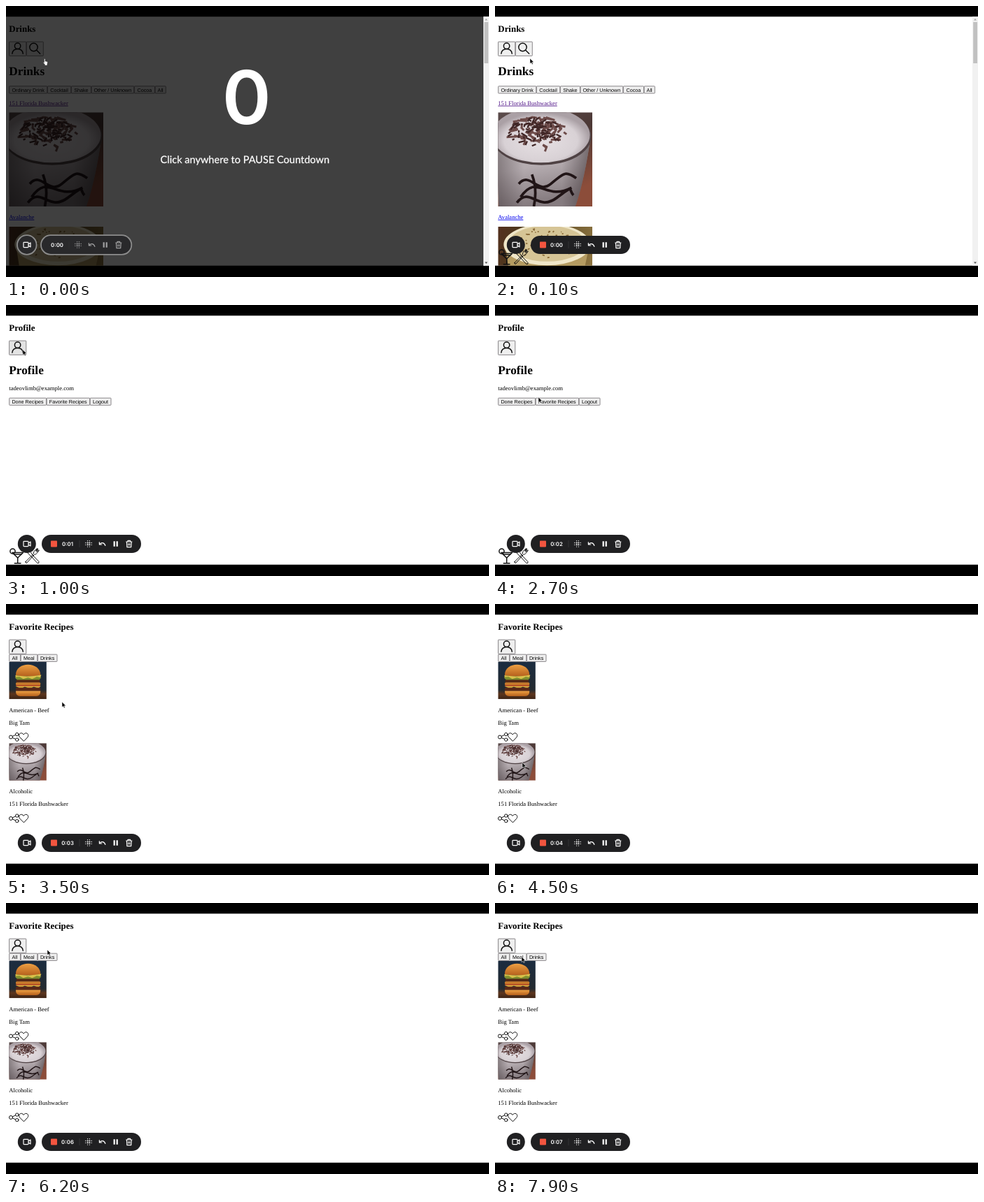
An HTML page for the animation above (8000 ms loop, 690 by 388 pixels).

```html
<!DOCTYPE html>
<html lang="en">
<head>
<meta charset="utf-8">
<title>Recipe app demo</title>
<style>
html, body { margin: 0; width: 100%; height: 100%; overflow: hidden; background: #000; }
svg { display: block; width: 100vw; height: 100vh; }
text { font: 8.6px "Liberation Serif", "Times New Roman", serif; text-rendering: geometricPrecision; }
.h2 { font-size: 12.93px; font-weight: 700; }
.h1 { font-size: 17.25px; font-weight: 700; }
.btn rect { fill: #efefef; stroke: #7d7a7d; stroke-width: .9; }
.btn text { font: 7.19px "Liberation Sans", Arial, sans-serif; text-anchor: middle; }
.btn.hover rect { fill: #e3e3e3; }
.btn.active rect { fill: #f6f6f6; stroke: #999; }
.line { fill: none; stroke: #111; stroke-width: 1.5; stroke-linecap: round; stroke-linejoin: round; }
.thin { stroke-width: 1; }
.link { text-decoration: underline; }
.clock { font: 600 7.8px Inter, sans-serif; fill: #fff; text-anchor: middle; }
.tool { fill: none; stroke: #fff; stroke-width: 1.2; stroke-linejoin: round; }
.count { font: 600 106px Inter, sans-serif; fill: #fff; text-anchor: middle; }
.hint { font: 14.55px Lato, sans-serif; fill: #fff; stroke: #fff; stroke-width: .25; text-anchor: middle; }
</style>
</head>
<body>
<svg id="stage" viewBox="0 0 690 388" preserveAspectRatio="none"></svg>
<script>
const LOOP = 8000, STEP = 100;

// time, x, y of the pointer tip
const PATH = [
  [0, 53, 75], [100, 50, 75], [500, 37, 69], [900, 24, 64], [1500, 24, 64],
  [2000, 36, 94], [2400, 50, 119], [2700, 62, 132], [3200, 80, 139], [3700, 80, 141],
  [3900, 80, 142], [4200, 62, 178], [4500, 39, 227], [4800, 34, 281], [5100, 33, 281],
  [5300, 33, 281], [5800, 44, 160], [6200, 59, 67], [6300, 59, 67], [6500, 60, 75],
  [6900, 60, 75], [7200, 38, 77], [8000, 38, 77]
];
const PRESSES = [[900, 1000], [3300, 3400], [6700, 6800], [7900, 8000]];

let seed = 7;
const rnd = () => (seed = seed * 16807 % 2147483647) / 2147483647;
const list = (n, fn) => Array.from({ length: n }, (_, i) => fn(i)).join("");

const text = (x, y, s, attrs = "") => `<text x="${x}" y="${y}" ${attrs}>${s}</text>`;
const use = (id, x, y, k = 1) => `<use href="#${id}" transform="translate(${x} ${y}) scale(${k})"/>`;

const button = (x, y, w, h, inner) =>
  `<g class="btn" data-box="${[x, y, x + w, y + h]}"><rect x="${x + .4}" y="${y + .4}" width="${w - .6}" height="${h - .8}" rx=".6"/>${inner}</g>`;

const buttonRow = (y, edges, labels) => labels.map((s, i) => {
  const x = edges[i], w = edges[i + 1] - x;
  return button(x, y, w, 11, text(x + w / 2, y + 8.2, s));
}).join("");

const person = button(4.2, 50.8, 24.8, 21,
  `<g class="line"><circle cx="16.6" cy="57.2" r="4.2"/><path d="M8.9 68.3C9.2 59.2 24 59.2 24.3 68.3"/></g>`);
const search = button(29, 50.8, 24.5, 21,
  `<g class="line"><circle cx="39.5" cy="59" r="5.7"/><path d="M43.7 63.2L48.7 68.3"/></g>`);

// strokes scattered inside an ellipse
const scatter = (n, cx, cy, rx, ry, len) => list(n, () => {
  const a = rnd() * 6.28, r = Math.sqrt(rnd()), d = rnd() * 3.14, l = len * (.4 + rnd());
  const x = cx + rx * r * Math.cos(a), y = cy + ry * r * Math.sin(a);
  return `M${x.toFixed(1)} ${y.toFixed(1)}l${(l * Math.cos(d)).toFixed(1)} ${(l * .6 * Math.sin(d)).toFixed(1)}`;
});

const defs = `<defs>
<linearGradient id="wall" x2=".5" y2="1"><stop stop-color="#5b4c4c"/><stop offset=".5" stop-color="#4c3835"/><stop offset="1" stop-color="#8c4d3a"/></linearGradient>
<linearGradient id="mugFill" x2=".25" y2="1"><stop stop-color="#c6bfc2"/><stop offset=".5" stop-color="#b5acb0"/><stop offset="1" stop-color="#857b7f"/></linearGradient>
<linearGradient id="side"><stop stop-color="#2a2022" stop-opacity=".4"/><stop offset=".3" stop-color="#2a2022" stop-opacity="0"/><stop offset=".7" stop-color="#2a2022" stop-opacity="0"/><stop offset="1" stop-color="#2a2022" stop-opacity=".5"/></linearGradient>
<radialGradient id="foam" cy=".6"><stop stop-color="#e6e0e3"/><stop offset=".75" stop-color="#d8d1d5"/><stop offset="1" stop-color="#aaa0a5"/></radialGradient>
<linearGradient id="gold" x2="1" y2=".3"><stop stop-color="#54301f"/><stop offset=".3" stop-color="#4b3b1c"/><stop offset="1" stop-color="#8d7440"/></linearGradient>
<linearGradient id="night" x2="0" y2="1"><stop stop-color="#1b2c40"/><stop offset=".75" stop-color="#232a30"/><stop offset=".86" stop-color="#5c351d"/><stop offset="1" stop-color="#3c2416"/></linearGradient>
<linearGradient id="bun" x2="0" y2="1"><stop stop-color="#eda043"/><stop offset="1" stop-color="#b5601c"/></linearGradient>
<clipPath id="square"><path d="M0 0H100V100H0z"/></clipPath>
<clipPath id="page"><path d="M0 15.3H690V371.7H0z"/></clipPath>
<g id="mug" clip-path="url(#square)">
  <path fill="url(#wall)" d="M0 0H100V100H0z"/>
  <path fill="url(#mugFill)" d="M-3 25L1 100H82Q91 75 98 28z"/>
  <path fill="url(#side)" d="M-3 25L1 100H82Q91 75 98 28z"/>
  <ellipse cx="46" cy="26" rx="53" ry="30" fill="#4f4244"/>
  <ellipse cx="45.5" cy="24" rx="52" ry="29.5" fill="url(#foam)"/>
  <path d="${scatter(85, 40, 21, 31, 17, 8)}" fill="none" stroke="#6d4b49" stroke-width="2.2"/>
  <path d="${scatter(65, 40, 20, 29, 15, 7)}" fill="none" stroke="#412727" stroke-width="1.7"/>
  <path d="M22 76C34 62 42 88 56 76S72 62 83 70M24 90C42 64 50 95 78 80M20 96C34 78 42 106 62 91S74 82 80 88M36 66Q42 82 38 100" fill="none" stroke="#211517" stroke-width="2.8"/>
</g>
<g id="cream" clip-path="url(#square)">
  <path fill="url(#gold)" d="M0 0H100V100H0z"/>
  <path fill="#b59c62" d="M8 24L20 100H80L96 24z"/>
  <ellipse cx="52" cy="19" rx="46" ry="22" fill="#efe6c8"/>
  <ellipse cx="52" cy="18" rx="41" ry="19" fill="#d6c596"/>
  <path d="${scatter(75, 52, 17, 36, 16, 2)}" fill="none" stroke="#8a6b38" stroke-width="1.3"/>
</g>
<g id="burger" clip-path="url(#square)">
  <path fill="url(#night)" d="M0 0H100V100H0z"/>
  <path fill="url(#bun)" d="M18 36C17 -2 84 -2 84 36Q50 42 18 36z"/>
  <path fill="#d9c04a" d="M17 36Q50 42 86 35L83 44 74 41 64 48 52 43 40 49 29 42 18 46z"/>
  <path fill="#7d8f2f" d="M16 41L28 40 38 46 50 42 62 46 74 40 86 42 80 49H22z"/>
  <rect x="19" y="48" width="63" height="7" rx="3" fill="#522716"/>
  <rect x="18" y="55" width="66" height="8" rx="3" fill="#c87a2b"/>
  <path fill="#b03d22" d="M19 62H83V67H19z"/>
  <path fill="#d8ad3f" d="M17 65H85L78 71 66 67 56 72 42 67 32 72z"/>
  <rect x="18" y="69" width="66" height="9" rx="4" fill="#5a2818"/>
  <path fill="url(#bun)" d="M18 78H84Q84 92 72 92H30Q18 92 18 78z"/>
</g>
<g id="icons" class="line">
  <circle cx="9.5" cy="352.5" r="3.6"/>
  <path d="M9 354.5H24.5L16.7 362z"/><path d="M11.5 357H22M16.7 362V369.5M12.3 369.8H21"/>
  <g class="thin"><path d="M28 349Q34 351 38 358L47 367.5Q47.5 370 45 369.7L36 360Q30 356 28 349z"/>
  <path d="M28 367.5L39.5 356Q39 353 41.5 351L45 348.3 42.5 352.2 46 349.4 43.6 353.3 47.4 351 44.4 355.2Q42.5 357.5 40.7 357.2L29.8 369.2Q27.5 370 28 367.5z"/></g>
</g>
<g id="share" class="line thin">
  <path d="M7 190.5L15.5 186.5M7 190.5L15.5 194.3"/>
  <g fill="#fff"><circle cx="7" cy="190.5" r="2.5"/><circle cx="15.8" cy="186.6" r="2.2"/><circle cx="15.8" cy="194.2" r="2.2"/></g>
  <path d="M25.2 196.2L19.5 190.5C16.5 186.5 22 182 25.2 187C28.4 182 34 186.5 31 190.5z"/>
</g>
<g id="tools">
  <path d="M105 337V347" stroke="#3b3b3d" stroke-width=".8"/>
  <g fill="#fff">${list(16, i => {
    const c = i % 4, r = i >> 2, ex = c % 3 === 0, ey = r % 3 === 0;
    return ex && ey ? "" : `<circle cx="${113.8 + c * 2.8}" cy="${337.7 + r * 2.8}" r="${ex || ey ? .65 : 1}"/>`;
  })}<path d="M153.6 338.2h2.2v7.6h-2.2zM157.6 338.2h2.2v7.6h-2.2z"/></g>
  <g class="tool"><path d="M133.4 339.2V343H137.2M133.6 342.8C136.3 339.3 140.5 339.9 142 344.9"/>
  <path d="M171.3 339H180.3M174 338.8V337.4H177.6V338.8M172.4 339L172.9 346.6H178.7L179.2 339M174.8 341.2V344.6M176.8 341.2V344.6"/></g>
</g>
<g id="camera" class="tool"><rect x="25" y="338.4" width="7" height="7.2" rx=".8"/><path d="M32 341L35 339V345L32 343"/></g>
</defs>`;

const drinks = `<g id="drinks">
${text(4.3, 37, "Drinks", 'class="h2"')}${person}${search}${text(4.3, 98.6, "Drinks", 'class="h1"')}
${buttonRow(114.4, [4.3, 59, 93, 121.7, 183, 212.7, 228.5], ["Ordinary Drink", "Cocktail", "Shake", "Other / Unknown", "Cocoa", "All"])}
${text(4.3, 141.7, "151 Florida Bushwacker", 'class="link" fill="#551a8b"')}${use("mug", 4.3, 152.3, 1.347)}
${text(4.3, 304.8, "Avalanche", 'class="link" fill="#0000ee"')}${use("cream", 4.3, 316, 1.347)}
</g>
<g id="scroll"><path fill="#f1f1f1" d="M682 15H690V372H682z"/><path fill="#c1c1c1" d="M683.2 23H689V82H683.2z"/>
<path fill="#a3a3a3" d="M684 20.5L686 18 688 20.5z"/><path fill="#505050" d="M684 366.5L686 369 688 366.5z"/></g>`;

const profile = `<g id="profile">
${text(4.3, 37, "Profile", 'class="h2"')}${person}${text(4.3, 98.6, "Profile", 'class="h1"')}
${text(4.3, 122, "tadeovlimb@example.com")}
${buttonRow(132.8, [4.3, 57.7, 119.8, 150.2], ["Done Recipes", "Favorite Recipes", "Logout"])}
</g>`;

const card = (dy, photo, kind, name) => `<g transform="translate(0 ${dy})">${use(photo, 4.3, 82.7, .536)}
${text(4.3, 154.6, kind)}${text(4.3, 172.7, name)}<use href="#share"/></g>`;

const favorites = `<g id="favorites">
${text(4.3, 37, "Favorite Recipes", 'class="h2"')}${person}
${buttonRow(71.8, [4.3, 20.8, 45, 73.2], ["All", "Meal", "Drinks"])}
${card(0, "burger", "American - Beef", "Big Tam")}${card(116.5, "mug", "Alcoholic", "151 Florida Bushwacker")}
</g>`;

const recorder = `<g id="recorder">
<circle cx="29.8" cy="342" r="13" fill="#202022"/><use href="#camera"/>
<rect x="51" y="329" width="142" height="26" rx="13" fill="#202022"/>
<rect x="64" y="337.6" width="9" height="8.8" rx=".8" fill="#f2553f"/>
${text(88, 344.8, "0:00", 'id="clock" class="clock"')}<use href="#tools"/>
</g>`;

const countdown = `<g id="countdown">
<path d="M0 15H682V372H0z" opacity=".75"/>
${text(343.8, 168.7, "0", 'class="count"')}${text(341.3, 225.4, "Click anywhere to PAUSE Countdown", 'class="hint"')}
<g fill="#29292b" stroke="#8c8c8c" stroke-width="1.8"><circle cx="29.8" cy="342" r="13.8"/><rect x="50" y="328.2" width="129.3" height="27.6" rx="13.8"/></g>
<use href="#camera"/>${text(73, 344.8, "0:00", 'class="clock"')}
<use href="#tools" x="-15" opacity=".55"/>
</g>`;

const pointer = `<g id="pointer">
<path id="arrow" d="M0 0V7.6L1.8 6 3 8.7 4.3 8.1 3.1 5.6H5.5z" stroke="#fff" stroke-width=".5"/>
<path id="hand" fill="#fff" stroke="#222" stroke-width=".4" d="M1.6 .8Q2.4 0 3 .9V4L5.6 4.5Q6.6 4.8 6.4 6L5.9 8.2V10H2.4V8.6L.2 6.2Q.2 5 1.6 6z"/>
</g>`;

const stage = document.getElementById("stage");
stage.innerHTML = defs + `<path d="M0 0H690V388H0z"/>
<g clip-path="url(#page)"><path fill="#fff" d="M0 0H690V388H0z"/>${drinks}${profile}${favorites}<use id="footer" href="#icons"/></g>
${recorder}${countdown}${pointer}`;

const $ = id => document.getElementById(id);
const show = (id, on) => $(id).setAttribute("visibility", on ? "visible" : "hidden");
const buttons = [...stage.querySelectorAll(".btn")].map(el => ({ el, box: el.dataset.box.split(",").map(Number) }));

function pointerAt(t) {
  const i = Math.max(1, PATH.findIndex(p => p[0] > t));
  const [t0, x0, y0] = PATH[i - 1], [t1, x1, y1] = PATH[i];
  const k = (t - t0) / (t1 - t0);
  return [x0 + (x1 - x0) * k, y0 + (y1 - y0) * k];
}

function draw(t) {
  const intro = t < 100, [x, y] = pointerAt(t);
  const pressed = PRESSES.some(([a, b]) => t >= a && t < b);
  show("drinks", t < 1000);
  show("scroll", t < 1000);
  show("profile", t >= 1000 && t < 3400);
  show("favorites", t >= 3400);
  show("footer", !intro && t < 3400);
  show("recorder", !intro);
  show("countdown", intro);
  show("hand", intro);
  show("arrow", !intro);
  $("clock").textContent = "0:0" + Math.floor(t / 1000);
  $("pointer").setAttribute("transform", `translate(${x.toFixed(2)} ${y.toFixed(2)})`);
  for (const { el, box: [l, top, r, b] } of buttons) {
    const over = x > l && x < r && y > top && y < b;
    el.classList.toggle("hover", over);
    el.classList.toggle("active", over && pressed);
  }
}

const start = performance.now();
function tick() {
  const t = (performance.now() - start) % LOOP;
  draw(Math.floor(t / STEP) * STEP);
  requestAnimationFrame(tick);
}
tick();
</script>
</body>
</html>
```
